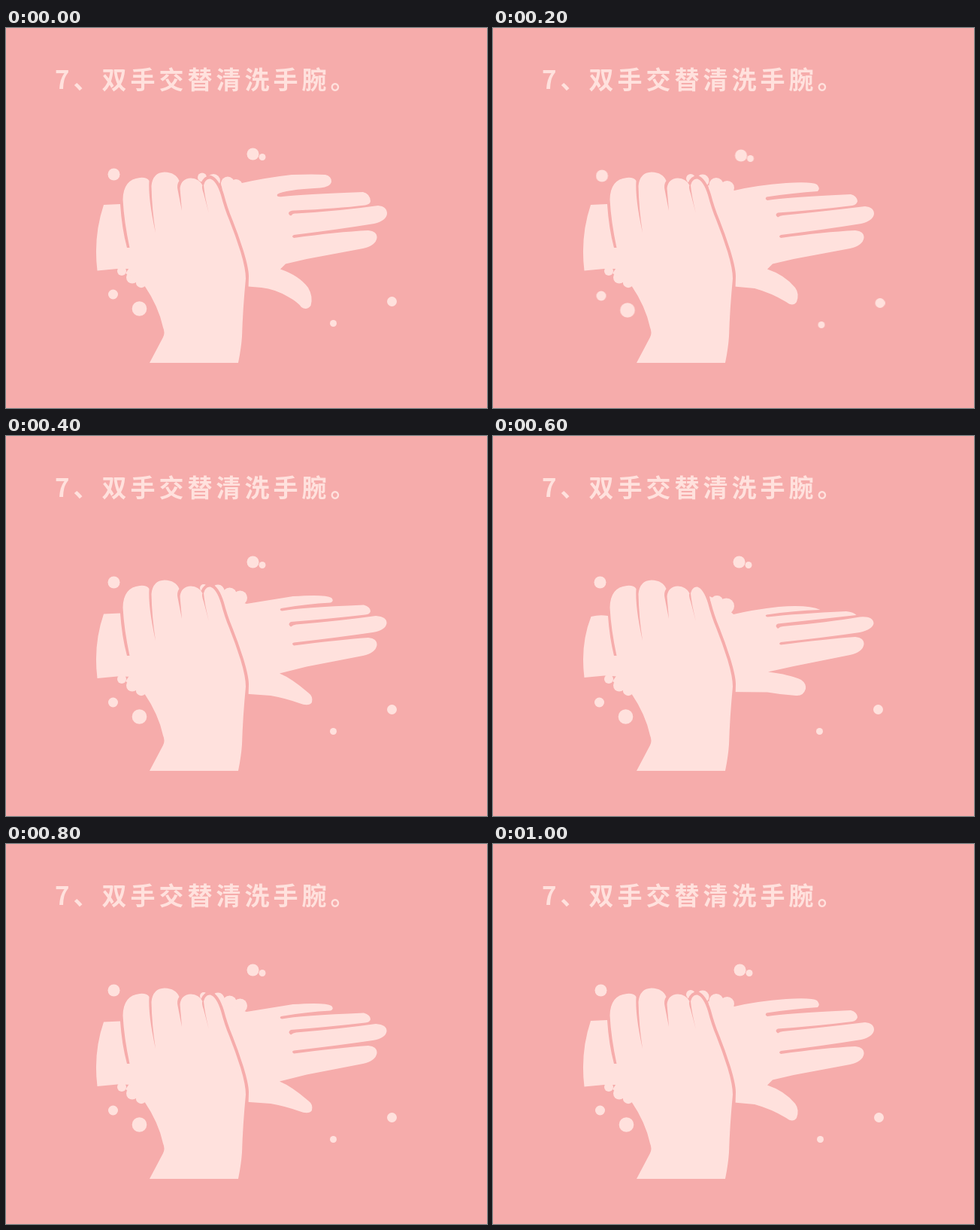
Write an HTML page that moves like this. It is 640 by 505 pixels and loops after 1.2 s.

```html
<!DOCTYPE html>
<html lang="zh-CN">
<head>
<meta charset="utf-8">
<title>双手交替清洗手腕</title>
<style>
  :root { --pink: #f6acab; --skin: #ffe1dd; }
  html, body { margin: 0; width: 100%; height: 100%; overflow: hidden; background: var(--pink); }
  svg { display: block; width: 100%; height: 100%; fill: var(--skin); }
  text { font: 700 33px "Noto Sans CJK SC", "Noto Sans CJK", sans-serif; letter-spacing: 5px; }
  .edge { fill: none; stroke: var(--pink); stroke-width: 8; }

  /* every pose is held for one sixth of the loop */
  .pose, .foam { animation: 1200ms step-end infinite; }
  .pose { opacity: 0; }
  .high { animation-name: high; }
  .mid  { animation-name: mid; }
  .low  { animation-name: low; }
  .flat { animation-name: flat; }
  .foam { animation-name: foam; }
  @keyframes high { 0% { opacity: 1 } 16.666%, 100% { opacity: 0 } }
  @keyframes mid  { 0%, 33.333% { opacity: 0 } 16.666%, 83.333%, 100% { opacity: 1 } }
  @keyframes low  { 0%, 50%, 83.333%, 100% { opacity: 0 } 33.333%, 66.666% { opacity: 1 } }
  @keyframes flat { 0%, 66.666%, 100% { opacity: 0 } 50% { opacity: 1 } }
  @keyframes foam {
    0%, 33.333%, 66.666%, 100% { transform: none }
    16.666% { transform: translate(1.5px, 2px) }
    50% { transform: translate(-1px, 0) }
  }
</style>
</head>
<body>
<svg viewBox="0 0 640 505" preserveAspectRatio="none">
  <text x="65" y="81">7、双手交替清洗手腕。</text>

  <g class="foam">
    <circle cx="143.5" cy="194.5" r="8"/>
    <circle cx="328.5" cy="167.5" r="8"/>
    <circle cx="341" cy="171.5" r="4.5"/>
    <circle cx="142.5" cy="354" r="6.5"/>
    <circle cx="177.5" cy="373" r="9.8"/>
    <circle cx="513.5" cy="363.5" r="6.5"/>
    <circle cx="435.5" cy="392.5" r="4.5"/>
  </g>

  <g class="pose high">
    <path d="M130 235L152 234Q154 266 161 292H175V320L148 320L121.500 322.500Q116 277 130 235Z"/>
    <circle cx="261" cy="198.500" r="6"/>
    <circle cx="276" cy="203" r="9"/>
    <circle cx="295" cy="206.500" r="9"/>
    <circle cx="306" cy="210" r="9"/>
    <path d="M286 205L314 206Q345 199 380 195Q410 194 425 195Q433 197 433 204Q432 211 418 212.500
      Q370 215 361 221Q359 225 368 224Q395 221 475 218Q484 220 485 230Q485 234 478 235.500
      Q440 240 385 242.500Q377 242 376 246Q377 250 380 249Q381 246 386 246.500Q446 243 495 236
      Q507 237 507 247Q506 256 490 260Q440 268 383 275Q379 277 383 279Q440 271 482 269
      Q494 270 493.500 279Q492 289 475 293L400 307L372 313.500L365 320.500Q390 329 402 345
      Q409 357 405.500 369Q400 376 393 371Q388 364 375 357Q358 347 340 345L310 342.500Z"/>
  </g>

  <g class="pose mid">
    <path d="M130 235L152 234Q154 266 161 292H175V320L148 320L121.500 322.500Q116 277 130 235Z"/>
    <circle cx="263" cy="200" r="6"/>
    <circle cx="279" cy="203" r="8.500"/>
    <circle cx="297" cy="208.500" r="9.500"/>
    <circle cx="311.500" cy="212.500" r="9.500"/>
    <path d="M286 209L321 216Q350 209 390 206Q425 204 431 208Q436 213 432 217
      Q400 219 364 224.500Q361 227 365 229Q390 225 476 221Q484 223 485 230Q484 235 478 236
      Q430 242 379 245.500Q374 248 379 251.500Q382 249 386 249Q446 243 495 237
      Q507 238 507 247Q506 256 490 260Q440 268 383 275Q379 277 383 279Q440 271 482 269
      Q494 270 493.500 279Q492 289 475 293L400 307L372 313.500L365 320.500Q388 328 402 345
      Q408 353 404 364Q399 371 390 364Q370 352 348 346L310 342.500Z"/>
  </g>

  <g class="pose low">
    <path d="M130 236.500L152 235.500Q154 266 161 292H175V320L148 319.500L121.500 322Q116 277 130 236.500Z"/>
    <circle cx="263" cy="202" r="5"/>
    <circle cx="282" cy="206" r="8.500"/>
    <circle cx="297.500" cy="211" r="9.500"/>
    <circle cx="311.500" cy="215" r="9.500"/>
    <path d="M286 211L320 223L382 213Q425 210 433 215Q437 219 432 221.500
      Q400 223 366 229Q363 231 367 232.500Q390 228 476 224.500Q485 227 485 233Q484 237 478 237.500
      Q430 243 379 247Q374 250 379 253.500Q382 251 386 250.500Q446 245.500 492 239
      Q507 240 506.500 249Q505 258 488 261Q440 268 383 274.500Q379 276 383 278.500Q440 271 482 268
      Q494 269 493.500 278Q492 288 475 292L400 306.500L364 315.500Q380 322 402 341
      Q409 346 407 354Q403 360 390 355Q370 348 352 345L310 342Z"/>
  </g>

  <g class="pose flat">
    <path d="M130.500 240Q142 237 153 239Q155 268 161 292H175V320L148 318.500L121.500 321Q116 277 130.500 240Z"/>
    <circle cx="298" cy="220.500" r="8.500"/>
    <circle cx="310.500" cy="226" r="10.500"/>
    <path d="M288 213L299 218L320 237Q345 231 380 227Q420 224 435.500 231
      Q400 232 364 237.500Q361 239 365 240.500Q405 236 470 233Q480 234 483.500 238
      Q430 244 379 249.500Q374 252 379 256Q382 253 386 253Q446 247.500 488 240.500
      Q506 239 506.500 249Q505 257 488 261Q440 268 383 274Q379 276 383 277.500Q440 270 482 267
      Q494 268 493.500 277Q492 287 475 291L400 306L366 313.500Q395 317 410 324
      Q417 329 416 336Q413 346 403 345Q385 344 365 340.500L310 340Z"/>
  </g>

  <circle cx="154" cy="323" r="6"/>
  <circle cx="168" cy="331.500" r="8"/>
  <circle cx="180" cy="338" r="7.200"/>
  <path class="edge" d="M263 208Q266 200 272 200Q280 203 286 222Q291 241 297 255Q305 275 312 297Q319 320 319 330L318.500 347"/>
  <path d="M191 445L209 411Q212 405 209 398Q203 370 184 342L159 326L164.500 318V292Q157 257 155.500 228
    Q156 201 178 199Q187 198 190.500 203Q189 227 199 272Q194 240 193.500 210
    Q195 192 211 191.500Q226 192 230.500 203Q227 208 228.500 215L234 243L231.500 213
    Q233 200 246 199.500Q257 200 261.500 209Q260 212 263 220L270 246.500Q264 222 263 209
    Q265 200 272 200.500Q280 203 286 222Q291 241 297 255Q305 275 312 297Q319 320 319 333
    Q315 375 314 410Q313 425 309 445Z"/>
</svg>
</body>
</html>
```
